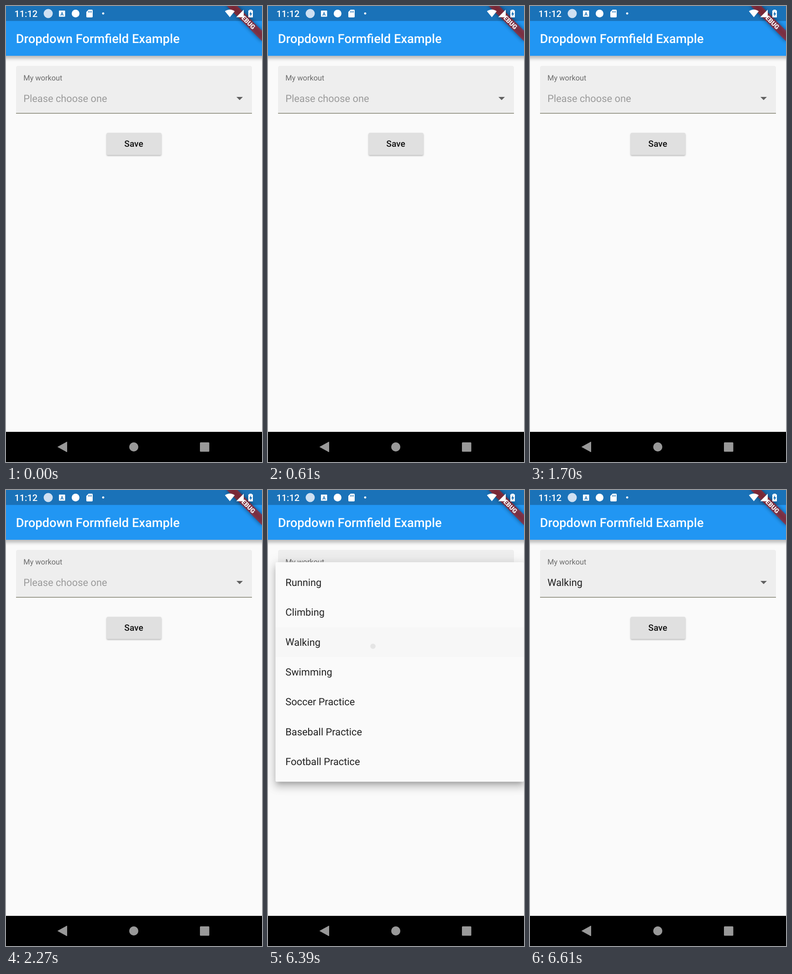
Animation, 561 px wide and 998 px high, one loop 8000 ms. Source, as an HTML page:

```html
<!DOCTYPE html>
<html lang="en">
<head>
<meta charset="utf-8">
<title>Dropdown form</title>
<style>
  html, body { margin: 0; width: 100%; height: 100%; overflow: hidden; background: #fafafa; }
  svg { display: block; width: 100%; height: 100%; font-family: Roboto, sans-serif; }
  /* the tiny turn keeps baselines from snapping to whole pixels */
  text { text-rendering: geometricPrecision; transform-box: fill-box; transform: rotate(.01deg); }
  .med { font-weight: 500; }
  .body { font-size: 21.82px; fill: rgba(0, 0, 0, .87); }
  .bar { filter: drop-shadow(0 6px 3.7px rgba(0, 0, 0, .25)); }
  .button { filter: drop-shadow(0 2.9px 1.8px rgba(0, 0, 0, .25)); }
</style>
</head>
<body>
<svg viewBox="0 0 561 998">
  <defs>
    <clipPath id="row"><rect x="16.4" y="300.3" width="545" height="65.4"/></clipPath>
  </defs>
  <rect width="561" height="998" fill="#fafafa"/>

  <!-- form -->
  <path d="M22 235V136q0-5 5-5H534q5 0 5 5V235z" fill="#eee"/>
  <rect x="22" y="234" width="517" height="1.5" fill="#828270"/>
  <text x="38.2" y="162.8" font-size="16.36" fill="#6b6b6b">My workout</text>
  <text id="value" class="body" x="38.2" y="209.6"></text>
  <path d="M505 199h14l-7 7z" fill="#616161"/>
  <rect class="button" x="220.5" y="277.5" width="120" height="48.5" rx="2.7" fill="#e0e0e0"/>
  <text class="med" x="280" y="308.2" font-size="19.09" text-anchor="middle" fill="#111">Save</text>

  <!-- app bar -->
  <rect class="bar" x="-20" y="-20" width="601" height="129" fill="#2196f3"/>
  <text class="med" x="21.8" y="80.8" font-size="27.27" fill="#fff">Dropdown Formfield Example</text>
  <rect width="561" height="32.7" fill="#1a72b8"/>

  <!-- dropdown menu -->
  <g id="menu">
    <g id="shadows"></g>
    <rect x="16.4" y="158" width="544.6" height="480.5" rx="2.7" fill="#fafafa"/>
    <g id="press" clip-path="url(#row)">
      <rect id="glow" x="16.4" y="300.3" width="544.6" height="65.4" fill="#bcbcbc"/>
      <circle id="ripple" cx="230" cy="342" fill="#c8c8c8" fill-opacity=".4"/>
    </g>
    <g id="items" class="body"></g>
  </g>

  <!-- corner ribbon -->
  <g transform="translate(561 0) rotate(45)">
    <rect x="-54.5" y="38.2" width="109" height="16.3" fill-opacity=".5" style="filter: blur(5px)"/>
    <rect x="-54.5" y="38.2" width="109" height="16.3" fill="#b71c1c" fill-opacity=".63"/>
    <text y="51.3" font-size="13.9" font-weight="900" text-anchor="middle" fill="#fff">DEBUG</text>
  </g>

  <!-- status icons -->
  <g fill="#fff">
    <text class="med" x="18.4" y="24" font-size="20">11:12</text>
    <circle cx="92.5" cy="16.5" r="10" fill="#cfe0f2"/>
    <rect x="116" y="10" width="13.5" height="13.5" rx="1"/>
    <text x="122.7" y="20.7" font-size="10.5" font-weight="700" text-anchor="middle" fill="#1a72b8">A</text>
    <circle cx="152.5" cy="16.5" r="8.5"/>
    <path d="M181 8h7q2 0 2 2V23q0 2-2 2H178q-2 0-2-2V13z"/>
    <path d="M181 11v3.5M184 11v3.5M187 11v3.5" stroke="#1a72b8" stroke-width="1.4"/>
    <circle cx="213" cy="16.3" r="2.4"/>
    <path d="M490.5 24.5L479.8 11.5Q490.5 4 501.2 11.5z"/>
    <path d="M504.5 24.5L521 8V24.5z"/>
    <path d="M533.5 9.5V8h5v1.5h1.5q1 0 1 1V24q0 1-1 1H532q-1 0-1-1V10.5q0-1 1-1z"/>
    <path d="M537 11.5l-4 7h2.5v4.500l4-7H537z" fill="#1a72b8"/>
  </g>

  <!-- navigation bar -->
  <rect y="932" width="561" height="66"/>
  <g fill="#999">
    <path d="M113.500 965L133.500 954V976z" stroke="#999" stroke-linejoin="round"/>
    <circle cx="280" cy="965" r="10"/>
    <rect x="425" y="955" width="20.5" height="20.5" rx="1.5"/>
  </g>
</svg>
<script>
  const LOOP = 8000, OPEN = 4790, PRESS = 6390, FADE = 6535, CLOSED = 6610;
  const ROW = 65.45;
  const get = id => document.getElementById(id);
  const [value, menu, press, glow, ripple, items] =
    ['value', 'menu', 'press', 'glow', 'ripple', 'items'].map(get);
  const clamp = x => Math.max(0, Math.min(1, x));

  const shadow = (drop, blur, spread, alpha) =>
    `<rect x="${16.4 - spread}" y="${158 + drop - spread}" width="${544.6 + 2 * spread}"
      height="${480.5 + 2 * spread}" fill-opacity="${alpha}" style="filter: blur(${blur}px)"/>`;
  get('shadows').innerHTML = shadow(6.8, 4.6, -4.1, .2) +
    shadow(10.9, 8.6, 1.4, .14) + shadow(4.1, 11.7, 2.7, .12);

  const names = ['Running', 'Climbing', 'Walking', 'Swimming',
    'Soccer Practice', 'Baseball Practice', 'Football Practice'];
  items.innerHTML = names.map((name, i) =>
    `<text x="38.2" y="${209.6 + i * ROW}">${name}</text>`).join('');

  function draw(t) {
    const chosen = t >= FADE, held = Math.max(0, t - PRESS);
    value.textContent = chosen ? 'Walking' : 'Please choose one';
    value.style.fill = chosen ? '' : '#9b9b9b';

    menu.style.display = t >= OPEN && t < CLOSED ? '' : 'none';
    menu.style.opacity = 1 - clamp((t - FADE) / (CLOSED - FADE));
    items.lastChild.style.opacity = t < PRESS ? .54 : 1;

    press.style.display = t >= PRESS ? '' : 'none';
    glow.style.opacity = .04 + .36 * clamp(held / 200);
    ripple.setAttribute('r', 5.5 + held * .3);
  }

  const start = performance.now();
  function tick() {
    draw((performance.now() - start) % LOOP);
    requestAnimationFrame(tick);
  }
  tick();
</script>
</body>
</html>
```
